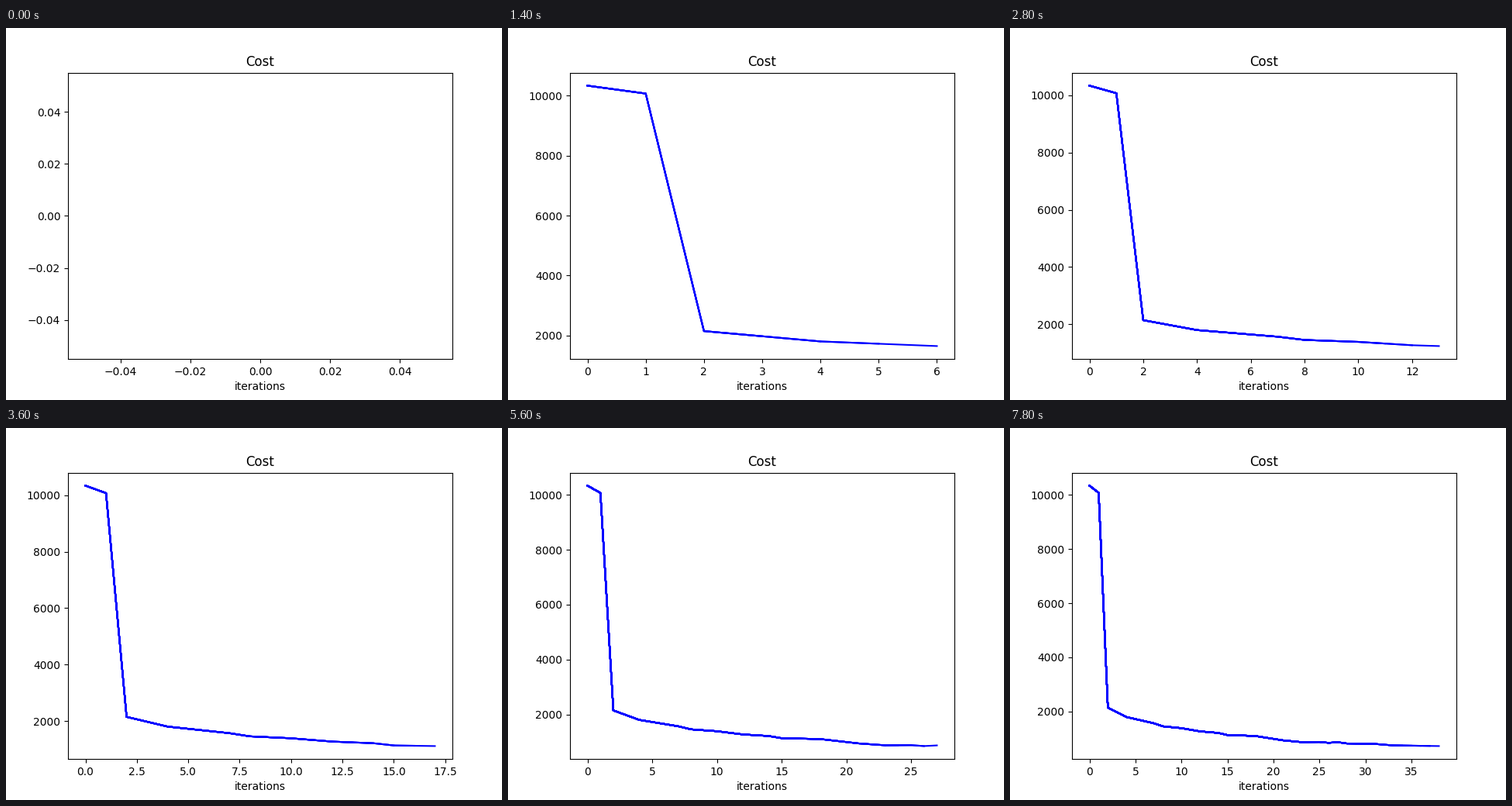
A matplotlib script that plays this animation: 640x480 px, repeating every 8 s.

```python
import matplotlib.pyplot as plt
import numpy as np
from matplotlib.animation import FuncAnimation

STEPS = 39

# Bends of the cost curve; the cost runs straight between them.
BENDS = [
    (0, 10338), (1, 10074), (2, 2145), (4, 1800), (7, 1568), (8, 1455),
    (10, 1387), (12, 1270), (14, 1212), (15, 1133), (18, 1100), (21, 940),
    (23, 874), (25, 880), (26, 846), (27, 870), (28, 822), (31, 807),
    (33, 751), (38, 727),
]
iterations = np.arange(STEPS)
costs = np.interp(iterations, *zip(*BENDS))

fig, ax = plt.subplots(figsize=(6.4, 4.8), dpi=100)


def update(step):
    ax.clear()
    ax.set_title("Cost")
    ax.set_xlabel("iterations")
    # Each step adds a longer curve on top of the earlier ones.
    for n in range(step + 1):
        ax.plot(iterations[:n], costs[:n], color="b")


anim = FuncAnimation(fig, update, frames=STEPS + 1, interval=200,
                     init_func=lambda: update(0), repeat=True,
                     repeat_delay=0)
plt.show()
```
